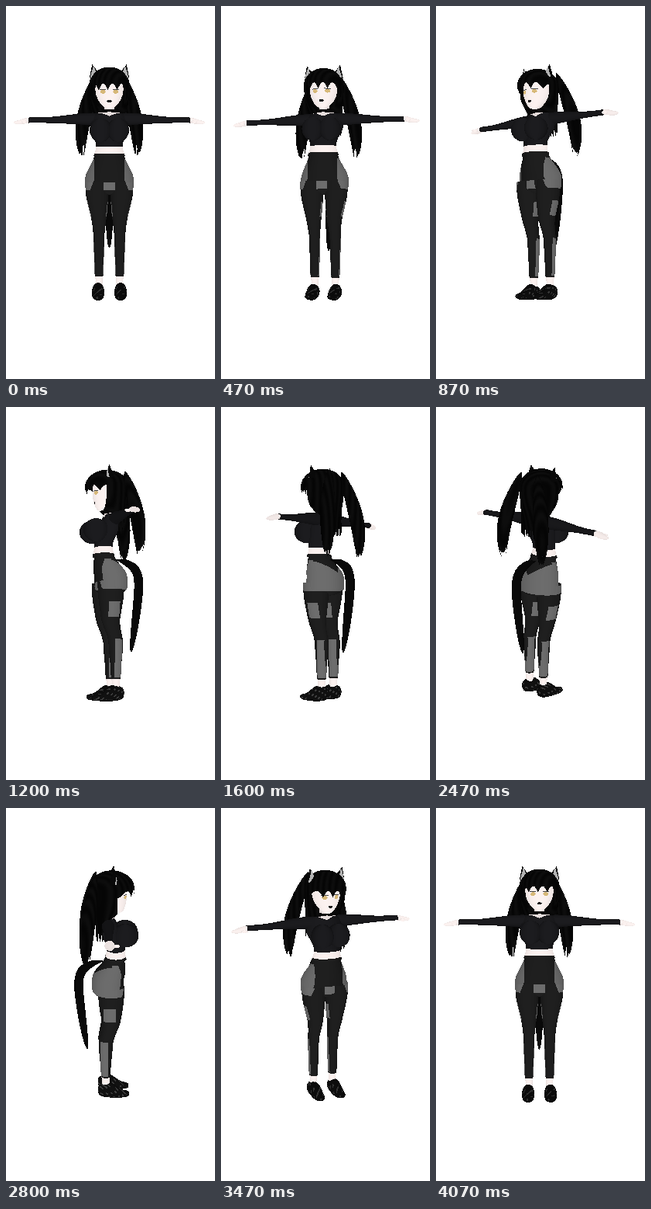
Recreate the animation shown at these times as an HTML page with a canvas. Size 270 by 480 pixels, loop 4.14 s.

```html
<!DOCTYPE html>
<html lang="en">
<head>
<meta charset="utf-8">
<title>Turntable figure</title>
<style>
html, body { margin: 0; width: 100%; height: 100%; overflow: hidden; background: #fff; }
canvas { display: block; width: 270px; height: 480px; image-rendering: pixelated; }
</style>
</head>
<body>
<canvas id="stage" width="270" height="480"></canvas>
<script>
const W = 270, H = 480, LOOP = 4140, STEP = 200 / 3, STEPS = 62;
const MID_X = 133.5, MID_Y = 225, DIST = 1300, SIDES = 18, ROWS = 28;
const ctx = document.getElementById('stage').getContext('2d');
const image = ctx.createImageData(W, H);
const pixels = new Uint32Array(image.data.buffer);
const depth = new Float32Array(W * H);
const { abs, sin, cos, min, max, floor, ceil, sqrt, exp, PI } = Math;

const ramp = (from, to, v) => {
  const u = max(0, min(1, (v - from) / (to - from)));
  return u * u * (3 - 2 * u);
};
const dome = v => sqrt(max(0, 1 - v * v));
const taper = (from, to, v) => dome(max(0, (v - from) / (to - from)));
const bump = (centre, width, v) => exp(-(((v - centre) / width) ** 2));
const oval = (x, y, rx, ry) => (x / rx) ** 2 + (y / ry) ** 2 < 1;

// Model space: x to her left, y down in stage pixels, z to her front.
const meshes = [];
const place = {
  x: (l, a, b) => [l, a, b],
  y: (l, a, b) => [a, l, b],
  z: (l, a, b) => [a, b, l]
};

// shape(l, u) gives the cross-section [centre a, centre b, radius a, radius b].
function tube(axis, from, to, shape, paint, side = 1) {
  const verts = [];
  const put = (l, a, b) => {
    const [x, y, z] = place[axis](l, a, b);
    return [x * side, y, z];
  };
  for (let i = 0; i <= ROWS; i++) {
    const u = (1 - cos(PI * i / ROWS)) / 2, l = from + (to - from) * u;
    const [a, b, ra, rb] = shape(l, u);
    for (let j = 0; j < SIDES; j++) {
      const c = cos(j / SIDES * 2 * PI), s = sin(j / SIDES * 2 * PI);
      verts.push({ p: put(l, a + ra * c, b + rb * s), n: put(0, c, s) });
    }
  }
  meshes.push({ verts, paint });
}
function pair(...args) {
  tube(...args, 1);
  tube(...args, -1);
}
const ballShape = (x, z, rx, rz) => (y, u) => [x, z, rx * dome(2 * u - 1), rz * dome(2 * u - 1)];

// Paint returns [r, g, b, shading strength], or null for a hole.
const grey = (v, shade = .3) => [v, v, v, shade];
const SKIN = [253, 243, 241, .09], NECK = [232, 223, 222, .08], GOLD = [214, 184, 120, 0];
const INK = grey(24, 0), SHIRT = [29, 29, 32, .4], PANTS = grey(32, .35), PATCH = grey(110, .22);
const strands = (x, z) => grey(10 + 4 * sin(x * .7 + z * .5), .5);

function paintHead(x, y, z) {
  const ax = abs(x);
  if (z > 4) {
    if (ax > 4 && ax < 12 && abs(y - 108.5) < .5) return grey(70, 0);
    if (oval(ax - 8, y - 111.5, 3.2, 2.4)) return GOLD;
    if (oval(x, y - 123.5, 3, 1.5)) return INK;
  }
  return SKIN;
}

function paintHair(x, y, z) {
  if (z > 10 && y > 110 - 8 * abs(sin(x * .27 + .5))) return null;
  if (y > 138 && z > -5) return null;
  return y > 161 + 5 * sin(x * 1.4) ? null : strands(x, z);
}

const paintLock = (x, y, z) => y > 186 + 7 * sin(x * .9 + z * .6) ? null : strands(x, z);

const paintEar = (x, y, z) =>
  z > 6 && y > 79 && abs(abs(x) - 20) < (y - 77) * .3 ? grey(180, .1) : grey(10);

function paintTorso(x, y, z) {
  if (y < 138 || (z > 0 && y < 142 - abs(x) * .4)) return NECK;
  return y < 181 ? SHIRT : y < 189.5 ? SKIN : PANTS;
}

function paintHips(x, y, z) {
  const ax = abs(x);
  if (y > 236.5) return PANTS;
  if (z > 3) {
    if (ax < 7 && y > 226) return PATCH;
    return y > 197 && ax > 19 + max(0, y - 222) * .4 ? PATCH : PANTS;
  }
  return y > 197 + 16 * max(0, 1 - ax / 24) ? PATCH : PANTS;
}

function paintLeg(x, y, z) {
  if (y > 349) return SKIN;
  if (y < 238) return paintHips(x, y, z);
  const thigh = y > 252 && y < 271 && abs(z) < 7.5;
  const calf = y > 299 && y < 347 && abs(z + 7) < 5;
  return thigh || calf ? PATCH : PANTS;
}

function paintShoe(x, y, z) {
  if (y > 375) return grey(24);
  return sin(x * .7 + z * .6) * sin(y * .8 - z * .4) > .6 ? grey(64) : grey(18, .4);
}

// Head and hair
tube('y', 89, 133, (y, u) => {
  const r = 18 * sqrt(max(0, sin(PI * u ** .8)));
  return [0, 5 + 7 * u ** 4, r, r * .95];
}, paintHead);
tube('y', 123, 141, () => [0, 1, 6.5, 6], () => NECK);
tube('y', 80, 168, y => {
  const top = taper(102, 79.5, y), fall = ramp(105, 158, y);
  return [0, 3 - 15 * fall, (26 - 5 * fall) * top, (29 - 24 * fall) * top];
}, paintHair);
pair('y', 76, 93, (y, u) => [22 - 5 * u, 6 - 2 * u, 8.5 * u, 6.5 * u], paintEar);
pair('y', 83, 197, (y, u) => {
  const swing = sin(1.88 * u), r = 9.5 * max(0, sin(PI * u)) ** .6;
  return [15 + 22 * swing, -17 - 13 * swing, r, r];
}, paintLock);

// Torso and arms
tube('y', 134, 193, y => [
  0, 1 + 7 * ramp(155, 178, y),
  6 + 19 * ramp(133, 143, y) - 7.5 * ramp(155, 178, y) + 3 * ramp(183, 195, y),
  5 + 7 * ramp(134, 158, y) + 2 * ramp(185, 193, y)
], paintTorso);
pair('y', 145, 175, ballShape(11, 20, 14, 17), () => SHIRT);
pair('x', 12, 123.5, x => {
  const tip = taper(106, 123.5, x);
  return [
    145.5 + 1.5 * ramp(30, 90, x) + 3 * ramp(102, 120, x), -2,
    (8 - 4.5 * ramp(15, 90, x)) * tip,
    (8 - 3.5 * ramp(15, 80, x) + 2 * bump(112, 7, x)) * tip
  ];
}, x => abs(x) < 104 ? SHIRT : SKIN);
pair('y', 147.5, 151, ballShape(109, 6, 4, 4), () => SKIN);

// Hips, legs, shoes and tail
tube('y', 189.5, 243, y => {
  const close = taper(232, 243, y);
  return [0, 7 - 9 * ramp(190, 222, y),
    (18.5 + 13 * ramp(188, 224, y)) * close, (12.5 + 8 * ramp(190, 215, y)) * close];
}, paintHips);
pair('y', 226, 364, y => {
  const knee = ramp(232, 302, y), shin = ramp(300, 345, y), ankle = 1.5 * ramp(347, 351, y);
  return [16 - 2.5 * ramp(235, 280, y), 2 - 7 * ramp(272, 305, y),
    15 - 8 * knee - shin - ankle, 17 - 7.5 * knee - 3 * shin - ankle];
}, paintLeg);
pair('z', -15, 26, (z, u) => {
  const end = sqrt(dome(2 * u - 1)), tall = 10.5 - 5.5 * ramp(-2, 20, z);
  return [14.5, 377.5 - tall, 8 * end, tall * end];
}, paintShoe);
tube('y', 196, 315, (y, u) => {
  const r = 6 * dome(u ** 1.5);
  return [0, -42 + 13 * u ** 1.5 + 26 * (1 - u) ** 12, r, r * (1 + .5 * bump(.04, .06, u))];
}, () => grey(11, .5));

function triangle(a, b, c, paint) {
  const area = (b.x - a.x) * (c.y - a.y) - (c.x - a.x) * (b.y - a.y);
  if (abs(area) < 1e-6) return;
  const x0 = max(0, ceil(min(a.x, b.x, c.x) - .5)), x1 = min(W - 1, floor(max(a.x, b.x, c.x) - .5));
  const y0 = max(0, ceil(min(a.y, b.y, c.y) - .5)), y1 = min(H - 1, floor(max(a.y, b.y, c.y) - .5));
  for (let y = y0; y <= y1; y++) for (let x = x0; x <= x1; x++) {
    const px = x + .5, py = y + .5;
    const u = ((px - a.x) * (c.y - a.y) - (c.x - a.x) * (py - a.y)) / area;
    const v = ((b.x - a.x) * (py - a.y) - (px - a.x) * (b.y - a.y)) / area;
    const w = 1 - u - v;
    if (min(u, v, w) < -1e-6) continue;
    const z = w * a.z + u * b.z + v * c.z, at = y * W + x;
    if (z <= depth[at]) continue;
    const mix = k => w * a.p[k] + u * b.p[k] + v * c.p[k];
    const ink = paint(mix(0), mix(1), mix(2));
    if (!ink) continue;
    depth[at] = z;
    const light = 1 - ink[3] * (1 - min(1, abs(w * a.lit + u * b.lit + v * c.lit)));
    pixels[at] = (255 << 24 | ink[2] * light << 16 | ink[1] * light << 8 | ink[0] * light) >>> 0;
  }
}

// One eased turn, while the camera dips below and rises above her.
const turnAt = s => 360 * ramp(0, 1, s) - 4.5 * sin(4 * PI * s) * sin(PI * s);
const liftAt = s => 5 - 11.5 * sin(2 * PI * (s + .035));

function render(s) {
  const turn = turnAt(s) * PI / 180, lift = liftAt(s) * PI / 180;
  const ct = cos(turn), st = sin(turn), cl = cos(lift), sl = sin(lift);
  pixels.fill(0xffffffff);
  depth.fill(-1e9);
  for (const { verts, paint } of meshes) {
    const view = verts.map(({ p, n }) => {
      const y = p[1] - MID_Y, near = p[0] * st + p[2] * ct;
      const z = near * cl - y * sl, f = DIST / (DIST - z);
      return {
        p, z,
        x: MID_X + (p[0] * ct - p[2] * st) * f,
        y: MID_Y + (y * cl + near * sl) * f,
        lit: (n[0] * st + n[2] * ct) * cl - n[1] * sl
      };
    });
    for (let i = 0; i < ROWS; i++) for (let j = 0; j < SIDES; j++) {
      const k = i * SIDES, next = (j + 1) % SIDES;
      const a = view[k + j], b = view[k + next], c = view[k + SIDES + j], d = view[k + SIDES + next];
      triangle(a, b, c, paint);
      triangle(b, d, c, paint);
    }
  }
  ctx.putImageData(image, 0, 0);
}

const start = performance.now();
let shown = -1;
function tick() {
  const t = (performance.now() - start) % LOOP;
  const step = min(STEPS - 1, floor((t + 4) / STEP));
  if (step !== shown) render((shown = step) / STEPS);
  requestAnimationFrame(tick);
}
tick();
</script>
</body>
</html>
```
